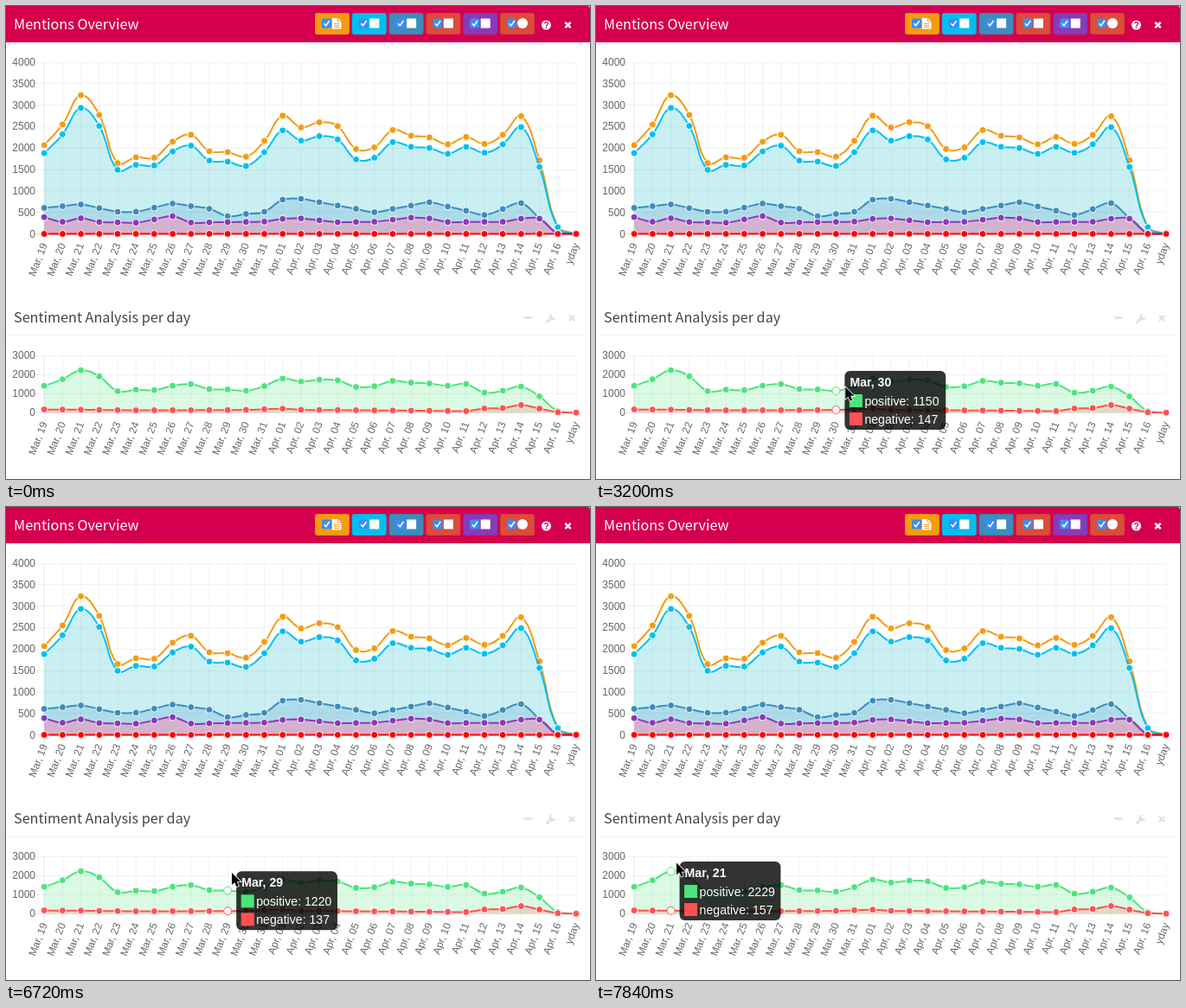
These frames come from a looping animation (675 px wide and 547 px high, 8000 ms). An HTML page:

```html
<!DOCTYPE html>
<html lang="en">
<head>
<meta charset="utf-8">
<title>Mentions dashboard</title>
<style>
html, body { margin: 0; width: 100%; height: 100%; overflow: hidden; background: #fff; }
svg { display: block; width: 675px; height: 547px; }
text { font-family: "Liberation Sans", Arial, sans-serif; font-size: 12px; fill: #666; }
.title { font-family: "Noto Sans CJK JP", "Noto Sans CJK SC", "Noto Sans CJK", "Open Sans", sans-serif; font-size: 16.2px; }
.tip text { font-size: 14.15px; fill: #fff; }
.tip .day { font-weight: bold; }
</style>
</head>
<body>
<svg id="stage" viewBox="0 0 675 547"></svg>
<script>
const LOOP = 8000, TICK = 160, LEFT = 44.2, STEP = 21.2, COUNT = 30, TENSION = 0.4;
const two = n => String(n).padStart(2, '0');
const xAt = i => LEFT + i * STEP;
const perDay = rule => Array.from({ length: COUNT }, (_, i) => rule(i));
const days = perDay(i => i < 13 ? `Mar, ${19 + i}` : i < 29 ? `Apr, ${two(i - 12)}` : 'yday');

// Linear path through key points [position, ...values].
function through(points, at) {
  const next = points.findIndex(p => p[0] > at);
  if (next < 0) return points[points.length - 1].slice(1);
  const a = points[next - 1], b = points[next];
  const f = (at - a[0]) / (b[0] - a[0]);
  return a.slice(1).map((v, k) => v + f * (b[k + 1] - v));
}
const trend = (...points) => perDay(i => through(points, i)[0]);

// Daily totals; the blue and green series are shares of them.
const totals = [
  2066, 2550, 3230, 2772, 1650, 1784, 1774, 2147, 2308, 1925, 1905, 1796, 2167, 2752, 2480,
  2600, 2510, 1976, 2016, 2419, 2288, 2248, 2087, 2258, 2097, 2308, 2742, 1714, 171, 0];
const shortShare = i => 0.91 - 0.035 * Math.sin(Math.PI * i / 29) ** 2;
const positiveShare = i => i < 24 ? 0.665 + 0.025 * Math.cos(2 * Math.PI * (i - 2) / 17) : 0.5;

const mentions = {
  top: 65, bottom: 263.5, max: 4000, tick: 500,
  series: [
    { color: '#f39c12', fill: 'none', data: totals },
    { color: '#00c0ef', fill: 'rgba(0,180,200,.21)', data: perDay(i => totals[i] * shortShare(i)) },
    { color: '#3c8dbc', fill: 'rgba(60,141,188,.2)', data: trend(
      [0, 605], [2, 685], [4.5, 470], [7, 705], [9, 585], [10, 413], [12, 514], [13, 796],
      [14, 816], [18, 504], [21, 736], [24, 440], [26, 715], [28, 10], [29, 0]) },
    { color: '#8a3ab9', fill: 'rgba(251,137,179,.5)', data: trend(
      [0, 390], [1, 282], [2, 363], [3, 275], [5, 260], [7, 413], [8, 262], [12, 285],
      [13.5, 380], [16, 272], [18, 282], [20.5, 400], [22, 275], [25, 282], [26, 353], [27, 353], [28, 10], [29, 0]) },
    { color: '#ff0000', fill: 'none', data: perDay(() => 0) }
  ]
};
const sentiment = {
  top: 404.3, bottom: 470.3, max: 3000, tick: 1000,
  series: [
    { name: 'positive', color: '#4be57b', fill: 'rgba(75,229,123,.2)',
      data: perDay(i => totals[i] * positiveShare(i)) },
    { name: 'negative', color: '#ff5252', fill: 'rgba(255,82,82,.2)', data: trend(
      [0, 170], [2, 157], [5, 125], [10, 137], [11, 147], [13, 210], [14, 150], [23, 85],
      [24, 220], [25, 240], [26, 400], [28, 25], [29, 0]) }
  ]
};

const yAt = (chart, v) => chart.bottom - v / chart.max * (chart.bottom - chart.top);
const rect = (x, y, w, h, fill, r = 0, extra = '') =>
  `<rect x="${x}" y="${y}" width="${w}" height="${h}" rx="${r}" fill="${fill}" ${extra}/>`;
const dot = (x, y, r, fill, stroke = 'none') =>
  `<circle cx="${x}" cy="${y}" r="${r}" fill="${fill}" stroke="${stroke}"/>`;
const stroke = (d, color, width = 1, extra = '') =>
  `<path d="${d}" fill="none" stroke="${color}" stroke-width="${width}" ${extra}/>`;
const label = (x, y, str, extra = '') => `<text x="${x}" y="${y}" ${extra}>${str}</text>`;

// Spline with handles scaled by neighbour distance and kept inside the plot.
function spline(pts, top, bottom) {
  const clamp = y => Math.min(bottom, Math.max(top, y));
  const handles = pts.map((p, i) => {
    const a = pts[i - 1] || p, b = pts[i + 1] || p;
    const da = Math.hypot(p.x - a.x, p.y - a.y), db = Math.hypot(b.x - p.x, b.y - p.y);
    const fa = TENSION * da / (da + db), fb = TENSION * db / (da + db);
    const dx = b.x - a.x, dy = b.y - a.y;
    return {
      before: `${p.x - fa * dx},${clamp(p.y - fa * dy)}`,
      after: `${p.x + fb * dx},${clamp(p.y + fb * dy)}`
    };
  });
  return pts.map((p, i) => i
    ? `C${handles[i - 1].after} ${handles[i].before} ${p.x},${p.y}`
    : `M${p.x},${p.y}`).join('');
}

function drawGrid(chart) {
  const { top, bottom, max, tick } = chart;
  const shade = first => `rgba(0,0,0,${first ? .1 : .05})`;
  let out = '';
  for (let v = 0; v <= max; v += tick) {
    const y = yAt(chart, v);
    out += stroke(`M34 ${Math.floor(y) + .5}H${xAt(COUNT - 1)}`, shade(v === 0))
      + label(34, y + 4, v, 'text-anchor="end"');
  }
  days.forEach((day, i) => {
    const x = xAt(i);
    out += stroke(`M${x} ${top}V${bottom + 10}`, shade(i === 0))
      + label(0, 4, day, `text-anchor="end" transform="translate(${x} ${bottom + 11}) rotate(-69)"`);
  });
  return out;
}

function drawSeries(chart, { color, fill, data }) {
  const pts = data.map((v, i) => ({ x: xAt(i), y: yAt(chart, v) }));
  const line = spline(pts, chart.top, chart.bottom);
  return `<path d="${line}V${chart.bottom}H${LEFT}Z" fill="${fill}"/>`
    + stroke(line, color, 2)
    + pts.map(p => dot(p.x, p.y, 4, color, '#fff')).join('');
}

const drawChart = chart =>
  drawGrid(chart) + chart.series.map(s => drawSeries(chart, s)).join('');

const cross = (x, y, r, color) =>
  stroke(`M${x - r} ${y - r}L${x + r} ${y + r}M${x + r} ${y - r}L${x - r} ${y + r}`, color, 2.4);

const fileIcon = x =>
  `<path d="M${x} 14h6.5l4 4v8.5h-10.5z" fill="#fff"/>`
  + stroke(`M${x + 6.5} 14v4h4M${x + 2} 20.5h6.5M${x + 2} 22.5h6.5M${x + 2} 24.5h6.5`, '#f39c12', .9);

function drawButton(color, i) {
  const x = 357 + 42.8 * i, icon = x + 20;
  const mark = i === 0 ? fileIcon(icon)
    : i === 5 ? dot(icon + 6, 20, 6, '#fff')
    : rect(icon + .5, 14.5, 11, 11, '#fff');
  return rect(x, 8, 40, 25, color, 3)
    + rect(x + .5, 8.5, 39, 24, 'none', 2.5, 'stroke="rgba(0,0,0,.06)"')
    + rect(x + 8, 14.5, 11, 11, '#3b8cf7', 2)
    + stroke(`M${x + 10.5} 20.3l2.3 2.5l4 -5.8`, '#fff', 1.6)
    + mark;
}

function drawHeaders() {
  const pale = '#dfe3ef';
  return `<path d="M0 0H672q3 0 3 3V42H0Z" fill="#d5004d"/>`
    + label(9, 27, 'Mentions Overview', 'class="title" style="fill:#fff"')
    + ['#f39c12', '#00c0ef', '#3c8dbc', '#dd4b39', '#8a3ab9', '#dd4b39'].map(drawButton).join('')
    + dot(624.5, 22, 5.5, '#fff')
    + label(624.5, 25.6, '?', 'text-anchor="middle" style="fill:#d5004d;font-size:10px;font-weight:bold"')
    + cross(649.5, 22, 3.2, '#fff')
    + label(9, 366, 'Sentiment Analysis per day', 'class="title" style="fill:#444"')
    + rect(599, 359, 9.5, 3, pale, 1)
    + stroke('M625.5 365.5L630.5 360.5', pale, 3, 'stroke-linecap="round"')
    + stroke('M631.5 357A2.6 2.6 0 1 0 633.8 360.2', pale, 2.2)
    + cross(654, 361, 3.2, pale)
    + rect(0, 381, 675, 1, '#f4f4f4');
}

function drawTooltip(i) {
  const rows = sentiment.series.map(s => ({ ...s, value: Math.round(s.data[i]), y: yAt(sentiment, s.data[i]) }));
  const x = xAt(i) + 10, y = (rows[0].y + rows[1].y) / 2 - 34;
  return rows.map(s => dot(xAt(i), s.y, 4.5, '#fff', s.color)).join('')
    + rect(x, y, 116.8, 68, 'rgba(0,0,0,.8)', 6)
    + label(x + 6, y + 18, days[i], 'class="day"')
    + rows.map((s, row) =>
      rect(x + 6, y + 27.5 + 21 * row, 14, 14, s.color, 0, `stroke="${s.color}"`)
      + label(x + 23, y + 39.5 + 21 * row, `${s.name}: ${s.value}`)).join('');
}

const stage = document.getElementById('stage');
stage.innerHTML = drawHeaders() + drawChart(mentions) + drawChart(sentiment)
  + '<g id="tip" class="tip"></g>'
  + '<path id="cursor" d="M0 0V14L3.2 11.1L5.4 16.2L7.9 15.1L5.8 10.2H10.2Z" fill="#000" stroke="#fff" stroke-width="1.6" paint-order="stroke"/>';
const tip = document.getElementById('tip'), cursor = document.getElementById('cursor');

// Pointer path as [ms, x, y], and the day whose tooltip is open from each time on.
const path = [
  [0, 316, 560], [320, 308, 479], [480, 304, 450], [800, 302, 439], [3040, 302, 439],
  [3520, 261, 444], [6560, 260, 444], [6720, 261, 423], [6880, 260, 394], [7040, 240, 371],
  [7200, 217.5, 373.5], [7360, 132, 396], [7520, 111, 405], [7840, 93, 411.5]
];
const hovers = [[0], [1920, 11], [3520, 10], [7040], [7360, 4], [7520, 3], [7680, 2]];

let shown = -1;
const start = performance.now();
function frame() {
  const t = Math.floor((performance.now() - start) % LOOP / TICK) * TICK;
  if (t !== shown) {
    shown = t;
    const day = hovers.filter(h => h[0] <= t).pop()[1];
    cursor.setAttribute('transform', `translate(${through(path, t)})`);
    tip.innerHTML = day === undefined ? '' : drawTooltip(day);
  }
  requestAnimationFrame(frame);
}
frame();
</script>
</body>
</html>
```
